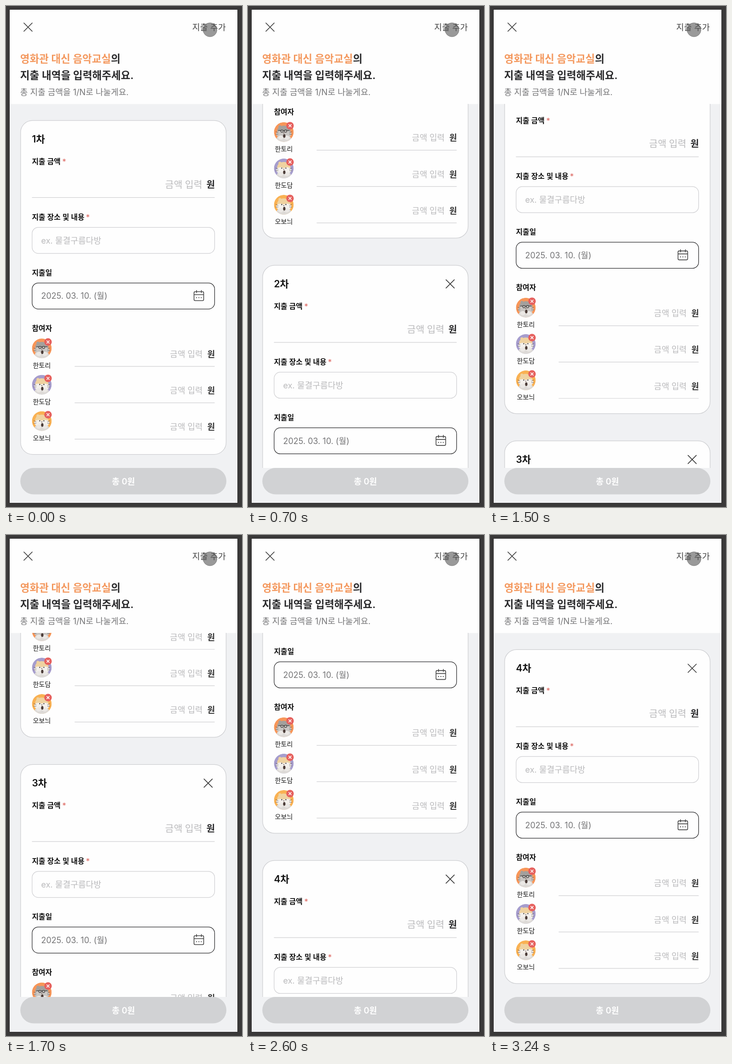
Write an HTML page that moves like this. It is 514 px wide and 1090 px high and loops after 3.38 s.

```html
<!DOCTYPE html>
<html lang="ko">
<head>
<meta charset="utf-8">
<title>지출 추가</title>
<style>
  html, body { margin: 0; width: 100%; height: 100%; overflow: hidden; background: #3a3939; }
  svg { display: block; width: 100vw; height: 100vh; }
  text { font-family: Inter, "Noto Sans CJK KR", "Noto Sans CJK", sans-serif; white-space: pre; }
</style>
</head>
<body>
<svg id="stage" viewBox="0 0 514 1090" xmlns="http://www.w3.org/2000/svg"></svg>
<script>
const LOOP = 3380;
const TICK = 100;
const SCROLL_TIME = 500;
const PITCH = 785.7;
const SCROLL_STARTS = [418.3, 1391, 2377];
const SCROLL_STOPS = [0, PITCH, PITCH * 2 + 0.4, PITCH * 3 - 0.4];

const people = [
  { name: '한토리', back: '#f79659', fur: '#a3a09d', muzzle: '#c9c6c3', glasses: true },
  { name: '한도담', back: '#a69dcd', fur: '#efd2a0', muzzle: '#f3f0ec' },
  { name: '오보늬', back: '#f9b153', fur: '#efd2a0', muzzle: '#f3f0ec' },
];

const text = (x, y, size, color, weight, str, anchor = 'start') =>
  `<text x="${x}" y="${y}" font-size="${size}" fill="${color}" font-weight="${weight}" text-anchor="${anchor}">${str}</text>`;

const line = (x1, x2, y) =>
  `<path d="M${x1} ${y}H${x2}" stroke="#cfcfd2" stroke-width="1.2"/>`;

const cross = (x, y, r, color, width) =>
  `<path d="M${x - r} ${y - r}l${2 * r} ${2 * r}m0 ${-2 * r}l${-2 * r} ${2 * r}" stroke="${color}" stroke-width="${width}" stroke-linecap="round" fill="none"/>`;

const box = (x, y, w, h, r, stroke) =>
  `<rect x="${x}" y="${y}" width="${w}" height="${h}" rx="${r}" fill="#fefefe" stroke="${stroke}" stroke-width="1.25"/>`;

const ellipse = (x, y, rx, ry, fill) =>
  `<ellipse cx="${x}" cy="${y}" rx="${rx}" ry="${ry}" fill="${fill}"/>`;

const pair = (x, y, rx, ry, fill) => ellipse(-x, y, rx, ry, fill) + ellipse(x, y, rx, ry, fill);

const label = (y, str, starX) =>
  text(56.5, y, 15.9, '#111', 600, str) +
  (starX ? text(starX, y + 1, 17, '#dc6660', 400, '*') : '');

function avatar({ back, fur, muzzle, glasses }) {
  const eyes = glasses
    ? `<path d="M-12 -3.5H12" stroke="#4a4745" stroke-width="1.2"/>
       <g fill="#d5d2ce" stroke="#3b3837" stroke-width="1.3"><circle cx="-4" cy="-2" r="2.5"/><circle cx="4" cy="-2" r="2.5"/></g>`
    : pair(4.5, -0.5, 1.1, 1.3, '#332c29');
  return `<g clip-path="url(#round)">
    <circle r="21.5" fill="${back}"/>
    ${ellipse(0, 17, 16, 13, '#dddad7')}
    ${pair(8.5, -11, 3.2, 3.6, fur)}
    ${ellipse(0, -2, 14.5, 12, fur)}
    ${pair(7, 4, 9.5, 6.5, muzzle)}
    ${pair(6.5, 12, 5.5, 4.5, '#ebe8e5')}
    ${ellipse(1, 8.5, 2.6, 4, '#4a3b37')}
    ${ellipse(0, 2, 1.3, 0.9, '#6b5650')}
    <path d="M-12 2l-6 -3M-12 5h-6M12 2l6 -3M12 5h6" stroke="#5d5552" stroke-width=".8"/>
    ${eyes}
  </g>`;
}

const participant = (person, i) => `<g transform="translate(0 ${i * 79.1})">
  <g transform="translate(78 744.8)">${avatar(person)}</g>
  <circle cx="91.5" cy="731" r="8.2" fill="#e6615e"/>
  ${cross(91.5, 731, 2.6, '#fff', 1.6)}
  ${text(78, 786.6, 14.2, '#161616', 500, person.name, 'middle')}
  ${text(428.5, 764, 18.1, '#bababc', 500, '금액 입력', 'end')}
  ${text(455, 764, 18, '#333', 600, '원', 'end')}
  ${line(149.5, 454.5, 784.2)}
</g>`;

const calendar = `<g fill="none" stroke="#444" stroke-width="1.6" stroke-linecap="round">
  <rect x="409.5" y="621.5" width="21" height="19.5" rx="2.5"/>
  <path d="M415 618.8v5M425.5 618.8v5M410 628H430"/>
  <path d="M415 634.5h.1M420.1 634.5h.1M425.2 634.5h.1" stroke-width="2.2"/>
</g>`;

const card = i => `<g transform="translate(0 ${i * PITCH})">
  ${box(31.8, 249, 447.6, 726.5, 26, '#cdced1')}
  ${text(56.5, 296.8, 21, '#111', 600, `${i + 1}차`)}
  ${i ? cross(440.3, 289.6, 9, '#3b3b3b', 1.7) : ''}
  ${label(344, '지출 금액', 122.5)}
  ${text(427.5, 395.5, 20.5, '#bababc', 500, '금액 입력', 'end')}
  ${text(455, 395.5, 20.2, '#2a2a2c', 600, '원', 'end')}
  ${line(56.5, 454.5, 416.7)}
  ${label(465, '지출 장소 및 내용', 174)}
  ${box(56.9, 481.5, 397.5, 56.8, 13.5, '#cfcfd2')}
  ${text(76.5, 516.6, 18.2, '#bababc', 400, 'ex. 물결구름다방')}
  ${label(586, '지출일')}
  ${box(56.9, 602.5, 397.5, 56.8, 13.5, '#2a2a2c')}
  ${text(76.5, 637.4, 18, '#757577', 400, '2025. 03. 10. (월)')}
  ${calendar}
  ${label(707, '참여자')}
  ${people.map(participant).join('')}
</g>`;

document.getElementById('stage').innerHTML = `
  <defs>
    <clipPath id="view"><rect x="8" y="213" width="496" height="792"/></clipPath>
    <clipPath id="round"><circle r="21.5"/></clipPath>
  </defs>
  <rect width="514" height="1090" fill="#3a3939"/>
  <rect x="7.5" y="7.5" width="497" height="1074" fill="#f0f1f3" stroke="#2a2929"/>
  <rect x="8" y="8" width="496" height="205.3" fill="#fefefe"/>
  ${cross(48, 46, 9, '#3b3b3b', 1.7)}
  ${text(405.5, 52.8, 18.5, '#444', 400, '지출 추가')}
  <circle cx="444.3" cy="51.8" r="15.2" fill="#555" fill-opacity=".6" stroke="#555" stroke-opacity=".5"/>
  ${text(30.8, 122.6, 22.5, '#f4995f', 600, '영화관 대신 음악교실<tspan fill="#2a2a2c">의</tspan>')}
  ${text(30.8, 158.6, 22.6, '#2a2a2c', 600, '지출 내역을 입력해주세요.')}
  ${text(30.8, 194, 18.1, '#757577', 400, '총 지출 금액을 1/N로 나눌게요.')}
  <g clip-path="url(#view)"><g id="cards">${SCROLL_STOPS.map((_, i) => card(i)).join('')}</g></g>
  <rect x="31.2" y="1005" width="448.8" height="57.4" rx="28.7" fill="#d1d2d4"/>
  ${text(255.7, 1040.7, 18.3, '#fff', 600, '총 0원', 'middle')}`;

const cards = document.getElementById('cards');
const ease = p => (1 - Math.cos(Math.PI * Math.min(1, Math.max(0, p)))) / 2;

function scrollAt(time) {
  return SCROLL_STARTS.reduce((y, start, i) =>
    y + (SCROLL_STOPS[i + 1] - SCROLL_STOPS[i]) * ease((time - start) / SCROLL_TIME), 0);
}

function draw(time) {
  const tick = Math.floor(time % LOOP / TICK) * TICK;
  cards.setAttribute('transform', `translate(0 ${-scrollAt(tick).toFixed(2)})`);
}

const begin = performance.now();
function loop() {
  draw(performance.now() - begin);
  requestAnimationFrame(loop);
}
loop();
</script>
</body>
</html>
```
